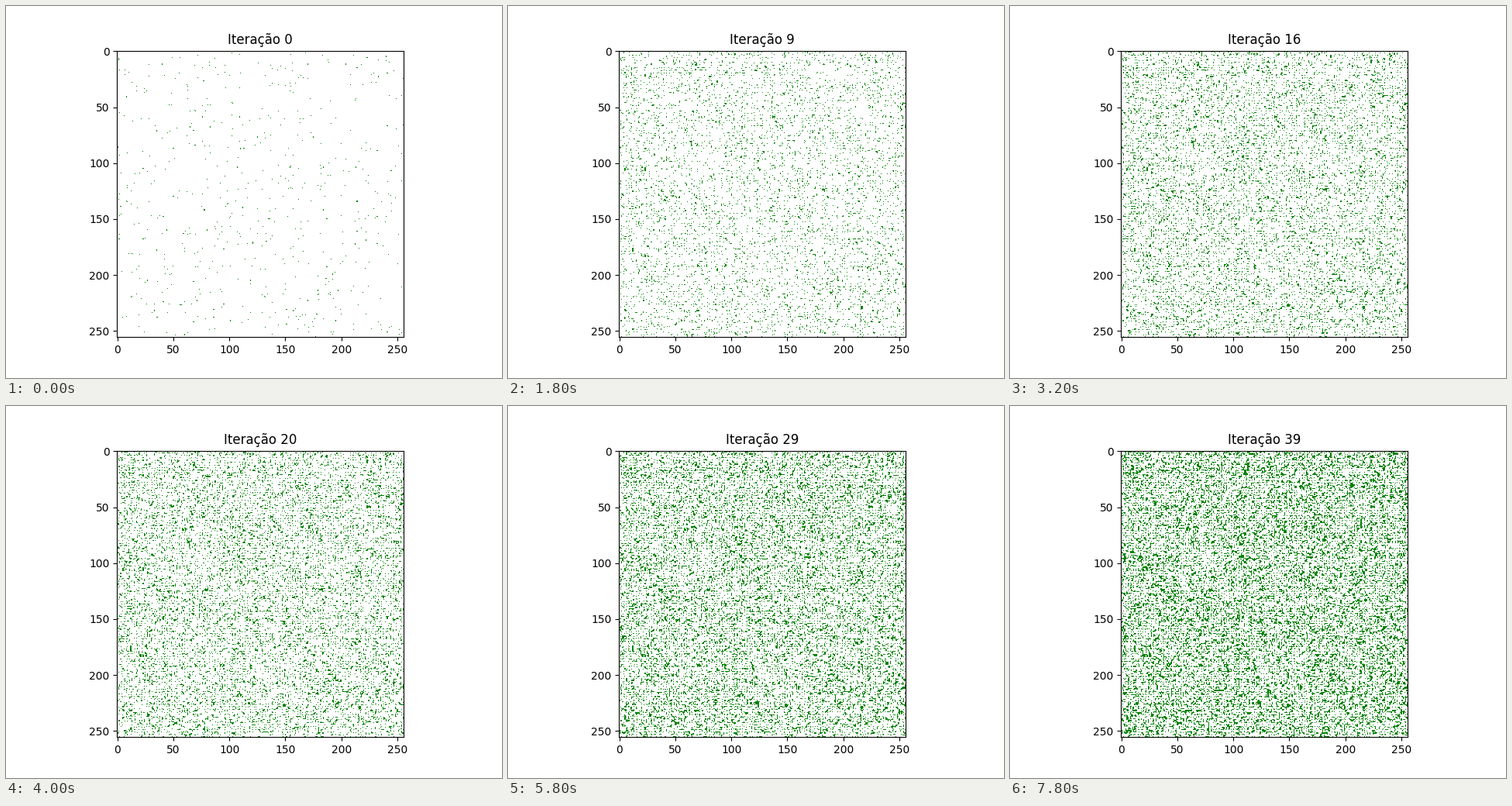
Animation, 640 px wide and 480 px high, one loop 8 s. Source, as a matplotlib script:

```python
import numpy as np
import matplotlib.pyplot as plt
from matplotlib.animation import FuncAnimation
from matplotlib.colors import ListedColormap

SIZE = 256
STEPS = 40
GROWTH = 0.01
TREE, BURNING = 1, 2

# Step at which each cell sprouts: constant chance per step, cells then stay.
rng = np.random.default_rng(7)
chance = 1 - rng.random((SIZE, SIZE))
sprout = np.floor(np.log(chance) / np.log(1 - GROWTH))

# The scale spans empty, tree and burning, so smoothed tree edges fall to white.
states = ListedColormap(["white", "green", "red"])
fig, ax = plt.subplots(figsize=(6.4, 4.8), dpi=100)
forest = ax.imshow(np.zeros((SIZE, SIZE)), cmap=states, vmin=0, vmax=BURNING,
                   interpolation="hanning", interpolation_stage="data")
title = ax.set_title("Iteração 0")


def update(step):
    forest.set_data(np.where(sprout <= step, float(TREE), 0.0))
    title.set_text(f"Iteração {step}")
    return forest, title


anim = FuncAnimation(fig, update, frames=STEPS, interval=200,
                     init_func=lambda: update(0), repeat=True, repeat_delay=0)
plt.show()
```
